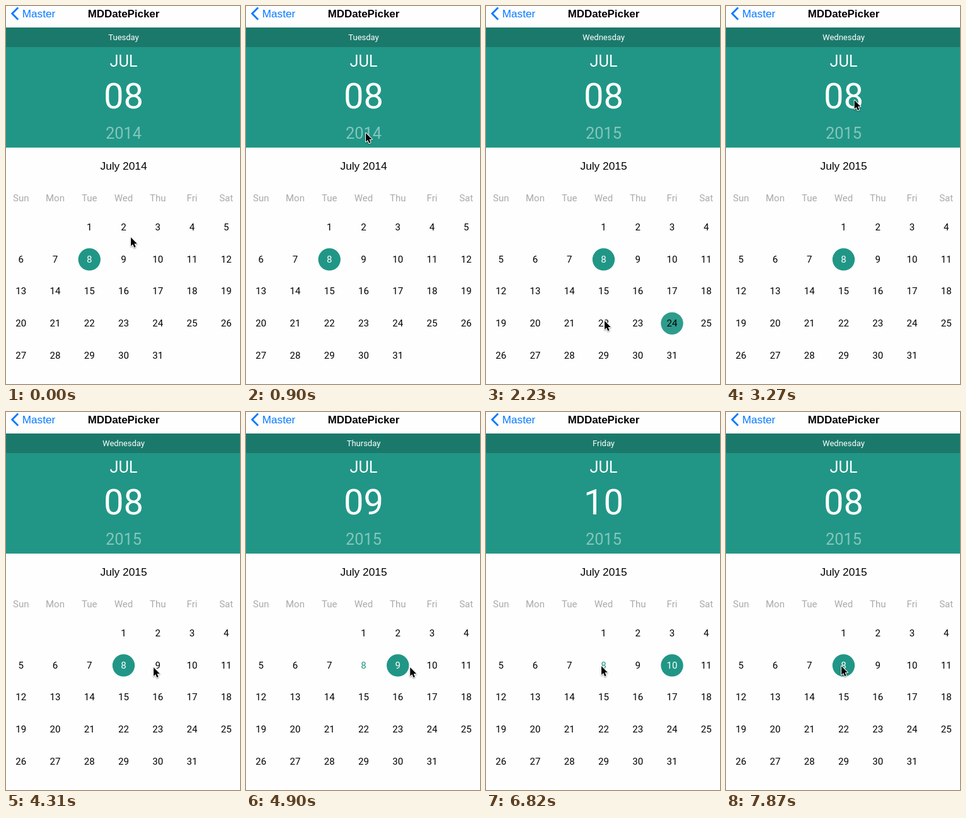
These frames come from a looping animation (371x598 px, 8000 ms). An HTML page with a canvas:

```html
<!DOCTYPE html>
<html lang="en">
<head>
<meta charset="utf-8">
<title>Date picker</title>
<style>
  html, body { margin: 0; width: 100%; height: 100%; overflow: hidden; background: #fefefe; }
  canvas { display: block; width: 371px; height: 598px; }
</style>
</head>
<body>
<canvas id="stage"></canvas>
<script>
const W = 371, H = 598, LOOP = 8000, TICKS = 54, MID = 186.5;
const TEAL = '#219686', DARK = '#1b796b', BLUE = '#087aff', BLACK = '#000', PAPER = '#fefefe';
const FADED = 'rgba(255,255,255,.45)';
const ROBOTO = 'Roboto, sans-serif';
const SYSTEM = '"Liberation Sans", Arial, sans-serif';
const WEEK = ['Sunday', 'Monday', 'Tuesday', 'Wednesday', 'Thursday', 'Friday', 'Saturday'];

const LIST_OPEN = 8, LIST_CLOSE = 14;
const PICKS = [{ tick: 31, day: 9 }, { tick: 38, day: 10 }, { tick: 48, day: 8 }];

// Pointer strokes, each easing out from where the last one ended.
const REST = { x: 198, y: 366 };
const MOVES = [
  { from: 1, to: 4, x: 204, y: 168 },
  { from: 4, to: 6, x: 190, y: 201 },
  { from: 9, to: 13, x: 188, y: 498 },
  { from: 17, to: 24, x: 205, y: 118 },
  { from: 24, to: 28, x: 226, y: 420 },
  { from: 28, to: 29, x: 234, y: 404 },
  { from: 32, to: 36, x: 294, y: 404 },
  { from: 38, to: 43, x: 163, y: 402 },
  { from: 43, to: 46, x: 183, y: 402 }
];

const canvas = document.getElementById('stage');
const scale = window.devicePixelRatio || 1;
canvas.width = Math.round(W * scale);
canvas.height = Math.round(H * scale);
const ctx = canvas.getContext('2d');

// Centres capitals on y, with the baseline on a whole pixel.
function text(str, x, y, size, color = BLACK, family = ROBOTO, weight = 400, align = 'center') {
  ctx.font = `${weight} ${size}px ${family}`;
  ctx.textAlign = align;
  ctx.fillStyle = color;
  ctx.fillText(str, x, Math.floor(y + size * 0.357));
}

function rect(x, y, w, h, color) {
  ctx.fillStyle = color;
  ctx.fillRect(x, y, w, h);
}

function disc(x, y, r, alpha = 1) {
  ctx.globalAlpha = alpha;
  ctx.fillStyle = TEAL;
  ctx.beginPath();
  ctx.arc(x, y, r, 0, Math.PI * 2);
  ctx.fill();
  ctx.globalAlpha = 1;
}

function pointerAt(tick) {
  let { x, y } = REST;
  for (const move of MOVES) {
    const k = Math.min(1, Math.max(0, (tick - move.from) / (move.to - move.from)));
    const eased = 1 - (1 - k) ** 2;
    x += (move.x - x) * eased;
    y += (move.y - y) * eased;
  }
  return { x, y };
}

function stateAt(tick) {
  const state = {
    listOpen: tick >= LIST_OPEN && tick < LIST_CLOSE,
    year: tick < LIST_CLOSE ? 2014 : 2015,
    offset: tick < LIST_CLOSE ? 2 : 3,
    day: 8, popping: false, fading: null
  };
  for (const pick of PICKS.filter(p => p.tick <= tick)) {
    state.popping = tick === pick.tick;
    state.fading = state.popping ? { day: state.day, alpha: 0.2 } : null;
    state.day = pick.day;
  }
  if (tick >= LIST_CLOSE && tick <= LIST_CLOSE + 1) state.fading = { day: 24, alpha: 0.94 };
  return state;
}

function drawNav() {
  ctx.strokeStyle = BLUE;
  ctx.lineWidth = 2.8;
  ctx.beginPath();
  ctx.moveTo(19.2, 2.5);
  ctx.lineTo(9.7, 12);
  ctx.lineTo(19.2, 21.5);
  ctx.stroke();
  text('Master', 25.7, 12.5, 17.2, BLUE, SYSTEM, 400, 'left');
  text('MDDatePicker', MID, 12.5, 16.9, BLACK, SYSTEM, 700);
}

function drawHeader({ listOpen, year, day, offset }) {
  rect(0, 34, W, 31, DARK);
  rect(0, 65, W, 159, TEAL);
  const dateColor = listOpen ? FADED : '#fff';
  text(WEEK[(offset + day - 1) % 7], MID, 49.5, 13, '#fff');
  text('JUL', MID, 87.7, 25.3, dateColor);
  text(String(day).padStart(2, '0'), MID, 142.5, 56, dateColor);
  text(year, MID, 201, 25.3, listOpen ? '#fff' : FADED);
}

function drawYears() {
  for (let year = 2011; year <= 2016; year++) {
    const y = 430.5 + (year - 2014) * 70;
    const chosen = year === 2014;
    if (chosen) disc(MID, y, 35.1);
    text(year, MID, y, 17.3, chosen ? '#fff' : BLACK, SYSTEM);
  }
}

function drawMonth({ year, day, offset, fading, popping }) {
  const column = i => 23.7 + i * 54.25;
  text(`July ${year}`, MID, 253.5, 17.3, BLACK, SYSTEM);
  WEEK.forEach((name, i) => text(name.slice(0, 3), column(i), 304, 15, '#aaa'));
  for (let d = 1; d <= 31; d++) {
    const cell = offset + d - 1;
    const x = column(cell % 7), y = 350.3 + Math.floor(cell / 7) * 50.6;
    const chosen = d === day;
    if (chosen) disc(x, y, popping ? 19.7 : 17.7, popping ? 0.75 : 1);
    if (fading && fading.day === d) disc(x, y, 17.7, fading.alpha);
    text(d, x, y, 15, chosen ? '#fff' : d === 8 ? TEAL : BLACK);
  }
}

function drawPointer({ x, y }) {
  const arrow = new Path2D('M0 0V13.8L3.1 11L5.3 16L7.6 15L5.5 10H9.8Z');
  ctx.save();
  ctx.translate(x, y);
  ctx.shadowColor = 'rgba(0,0,0,.4)';
  ctx.shadowBlur = 2 * scale;
  ctx.shadowOffsetY = scale;
  ctx.strokeStyle = '#fff';
  ctx.lineWidth = 2;
  ctx.lineJoin = 'round';
  ctx.stroke(arrow);
  ctx.shadowColor = 'transparent';
  ctx.fillStyle = BLACK;
  ctx.fill(arrow);
  ctx.restore();
}

function render(time) {
  const tick = Math.floor((time % LOOP) / LOOP * TICKS);
  const state = stateAt(tick);
  ctx.setTransform(scale, 0, 0, scale, 0, 0);
  rect(0, 0, W, H, PAPER);
  if (state.listOpen) drawYears();
  else drawMonth(state);
  drawHeader(state);
  drawNav();
  drawPointer(pointerAt(tick));
}

const start = performance.now();
function loop() {
  render(performance.now() - start);
  requestAnimationFrame(loop);
}
loop();
</script>
</body>
</html>
```
